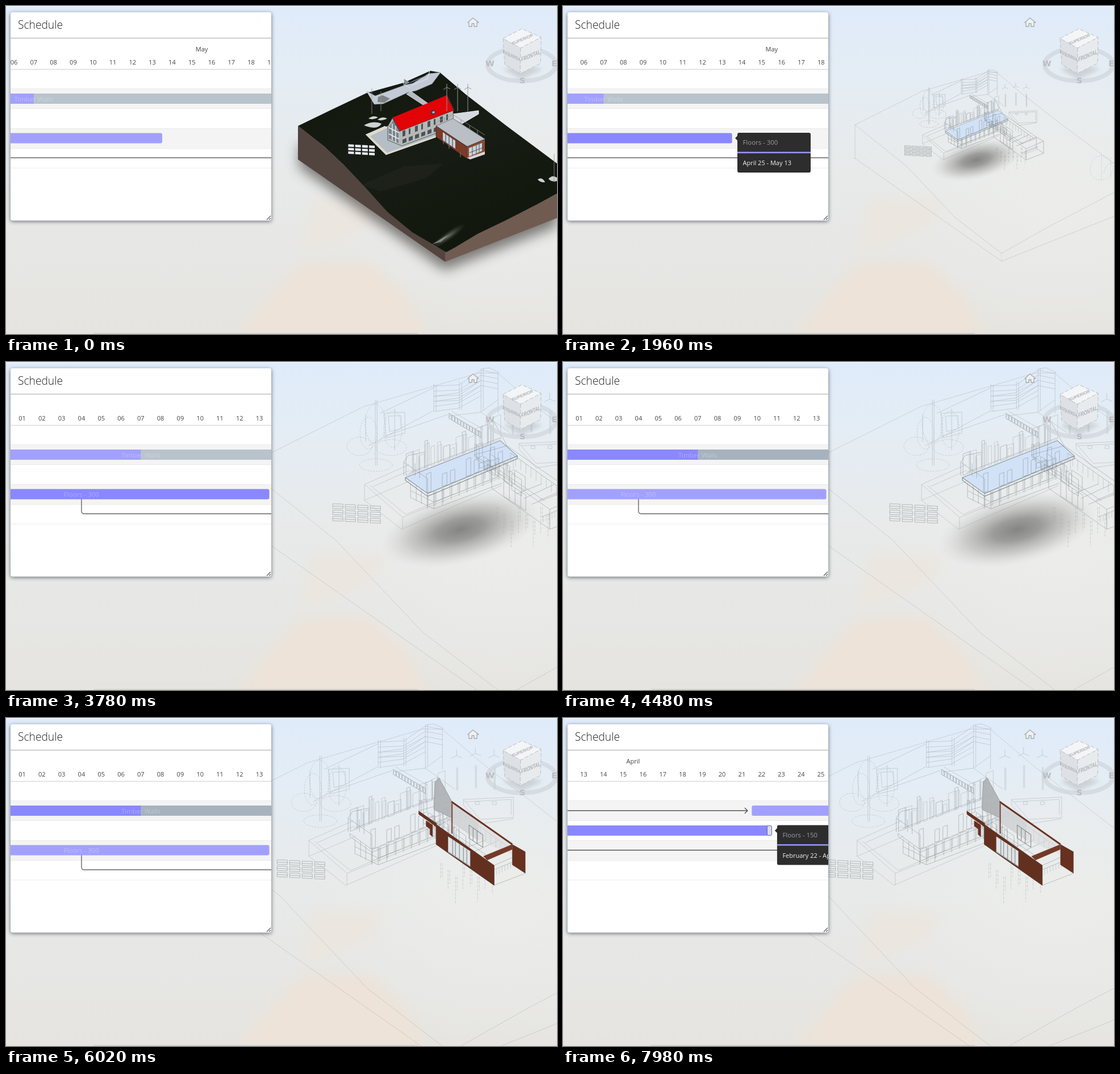
An HTML page for the animation above (8 s loop, 970x577 px).

```html
<!DOCTYPE html>
<html lang="en">
<head>
<meta charset="utf-8">
<title>Schedule</title>
<style>
html, body { margin: 0; width: 100%; height: 100%; overflow: hidden; background: #e5e6e5; }
svg { display: block; width: 970px; height: 577px; }
text { font-family: "Open Sans", "Noto Sans", sans-serif; }
.wire path, .wire ellipse { fill: none; vector-effect: non-scaling-stroke; }
.day { font-size: 11px; fill: #444; text-anchor: middle; }
.label { font-size: 11.4px; fill: #fff; fill-opacity: .29; text-anchor: middle; }
.cube { font: bold 7.2px "Liberation Sans", Arial, sans-serif; fill: #aeb2b6; text-anchor: middle; }
.compass { font: bold 14px "DejaVu Sans", sans-serif; fill: #b9bdc1; text-anchor: middle; }
</style>
</head>
<body>
<svg viewBox="0 0 970 577" xmlns="http://www.w3.org/2000/svg">
<defs>
  <linearGradient id="sky" x1="0" y1="0" x2="0" y2="1">
    <stop offset="0" stop-color="#dfebfa"/><stop offset=".2" stop-color="#e4edf5"/>
    <stop offset=".5" stop-color="#e8eaea"/><stop offset="1" stop-color="#e5e4e0"/>
  </linearGradient>
  <radialGradient id="pale"><stop offset="0" stop-color="#ecedeb"/><stop offset="1" stop-color="#ecedeb" stop-opacity="0"/></radialGradient>
  <radialGradient id="dim">
    <stop offset="0" stop-color="#7f7f7d" stop-opacity=".95"/><stop offset=".3" stop-color="#888886" stop-opacity=".8"/>
    <stop offset=".65" stop-color="#a0a09e" stop-opacity=".42"/><stop offset="1" stop-color="#ccc" stop-opacity="0"/>
  </radialGradient>
  <linearGradient id="ground" x1="0" y1="0" x2=".6" y2="1"><stop offset="0" stop-color="#12170e"/><stop offset=".55" stop-color="#171c14"/><stop offset="1" stop-color="#11170d"/></linearGradient>
  <radialGradient id="shine"><stop offset="0" stop-color="#c4c7c2" stop-opacity=".5"/><stop offset="1" stop-color="#555" stop-opacity="0"/></radialGradient>
  <filter id="soft" x="-20%" y="-20%" width="140%" height="140%"><feGaussianBlur stdDeviation="11"/></filter>
  <filter id="drop" x="-10%" y="-10%" width="120%" height="120%"><feGaussianBlur stdDeviation="3.5"/></filter>
  <clipPath id="inside"><rect x="8" y="57" width="459" height="318"/></clipPath>
</defs>

<rect width="970" height="577" fill="url(#sky)"/>
<ellipse cx="870" cy="330" rx="330" ry="260" fill="url(#pale)"/>
<path d="M520 452L640 450 700 505 745 580 405 580 470 505Z" fill="#ede3d8" filter="url(#soft)"/>
<path d="M540 340L670 340 650 385 520 440Z" fill="#ebe6df" filter="url(#soft)"/>
<rect width="970" height="1.5" fill="#f4f7fb"/>
<rect x="155" y="575" width="570" height="2" fill="#d6d4cf"/>

<g id="solid">
  <path d="M516 240V284L772 465 970 388V345L760 380Z" fill="#55524f" opacity=".75" filter="url(#soft)"/>
  <path d="M514 211L560 247 595 280 633 320 672 363 715 398 775 432 773 450 514 270Z" fill="#52443e"/>
  <path d="M773 432L790 425 830 401 880 377 935 349 970 330V373L773 450Z" fill="#705b51"/>
  <path d="M514 211L576 181 635 153 700 135 747 114 764 117 810 156 880 210 970 277V330L935 349 880 377 830 401 790 425 775 433 715 398 672 363 633 320 595 280 560 247Z" fill="url(#ground)"/>
  <path d="M625 315L700 282 770 277 740 303 660 326Z" fill="#30362f" opacity=".25"/>
  <ellipse cx="778" cy="405" rx="38" ry="8" transform="rotate(-35 778 405)" fill="url(#shine)"/>
  <path d="M750 419q18-11 28-16l-12 12Z" fill="#c9cdc8" opacity=".5"/>
  <path d="M635 150L650 158 702 139 716 136 744 119 765 117 750 137 722 149 708 152 664 172 649 173Z" fill="#c3cad6" stroke="#7d858c" stroke-width=".6"/>
  <path d="M700 128L712 135 738 124 746 114 740 122 718 131 702 139Z" fill="#888f94"/>
  <path d="M635 150l14 23M700 128v10l11 6M746 114l-4 14-28 12" fill="none" stroke="#e4e7ea" stroke-width="1"/>
  <path d="M655 160l8-3 13 6-10 7-12-1Z" fill="#7c8485"/>
  <path d="M705 155l8-5 35 25-6 4Z" fill="#b5bbc2" stroke="#dfe3e6" stroke-width=".8"/>
  <path d="M638 198q9-7 17-2-8 5-17 2M654 200q9-7 17-2-9 5-17 2M630 210q16-9 31-3-4 7-13 7-7 0-18-4M936 305q8-5 13 5-9 1-13-5M955 304q7-8 15-2v6q-10 2-15-4" fill="#cdd2d3"/>
  <path d="M633 226L672 211 680 216 680 229 757 220V231L669 262Z" fill="#b5bdc5"/>
  <path d="M633 226L667 211 672 214 641 229 671 258 757 228V231L669 262Z" fill="#dddacd"/>
  <path d="M787 190L832 184V190L803 207 786 197Z" fill="#d4d9df" stroke="#fff" stroke-width=".8"/>
  <path d="M672 212L681 196 694 220 787 184 788 204 757 217V224L697 246 672 236Z" fill="#b7b8b5" stroke="#454b4e" stroke-width=".8"/>
  <path d="M674 213l8-12 9 20v20l-17-8Z" fill="#78838c"/>
  <path d="M680 207v29M686 211v29M674 225l18 9M674 214l18 9" stroke="#eef1f3" stroke-width="1.4"/>
  <g id="panes" fill="#48535c"></g>
  <path d="M681 196L776 157 788 183 694 220Z" fill="#e20307"/>
  <path d="M680 196L693 221M776 157L789 184" stroke="#34383a" stroke-width="1.5"/>
  <path d="M747 185l7-3 2 7-7 3Z" fill="#394046"/><path d="M750 186l4-1 1 3-4 1Z" fill="#9fc0d4"/>
  <path d="M757 211L787 198 843 234 812 247Z" fill="#b9bfc5" stroke="#777f84"/>
  <path d="M757 211L812 248V269L757 230Z" fill="#7a3b29" stroke="#36241f" stroke-width=".7"/>
  <path d="M769 222l22 15v14l-22-15Z" fill="#c6d1d9"/>
  <path d="M774 224v17M780 229v16M786 232v17" stroke="#343a40"/>
  <path d="M812 248L843 235V257L812 269Z" fill="#8e4934"/>
  <path d="M815 250l23-9v14l-23 10Z" fill="#c8d4dc"/>
  <path d="M821 247v16M828 244v16M833 242v15M816 258l24-9" stroke="#444" stroke-width=".9"/>
  <path d="M812 267l31-11v5l-26 9Z" fill="#d7d7d4"/>
  <path d="M757 204l30-13 56 36M757 204v7M772 198v7M787 191v8M801 200v8M816 210v8M830 218v8M770 235v8M780 243v8M800 258v8" fill="none" stroke="#8d9599" stroke-width=".8"/>
  <g id="sun" fill="#eceff5"></g>
  <g id="mills" fill="none" stroke="#929999"></g>
  <path d="M644 145v45M660 150v35M965 260v50" stroke="#8d9694" stroke-width=".8"/>
</g>

<g id="ghost">
  <g class="wire" stroke="#b4b9bb" stroke-width=".7">
    <path stroke-dasharray="3 1" d="M514 268V209L576 178 632 150 745 117 764 117 810 156 880 210 970 277M514 209L605 282 690 372 772 435 850 391 970 328M514 268L772 449 970 370"/>
    <path stroke-dasharray="1 2" d="M772 435v14"/>
    <path stroke="#a9c6d4" stroke-dasharray="2 2" d="M928 290q2-27 19-26t21 22q-4 21-21 20t-19-16M952 294q4-19 18-18M948 262v45M964 266v40"/>
  </g>
  <ellipse id="shade" cx="727" cy="271" rx="80" ry="34" transform="rotate(-13 727 271)" fill="url(#dim)"/>
  <g transform="matrix(.5596 0 0 .5596 334.6 106.3)">
    <g id="site" class="wire" stroke="#9da4a8" stroke-width=".7" opacity=".6"></g>
    <g id="slab"><path d="M605 203L772 138 802 165 644 231Z" fill="#cadffa" fill-opacity=".75" stroke="#8b96a0"/><path d="M605 203v5l39 28 158-66v-5" fill="none" stroke="#828c95"/></g>
    <g id="house" class="wire" stroke="#70777c" stroke-width=".7" opacity=".58"></g>
    <g id="walls">
      <path d="M753 151L755 112 762 105 785 147V176L753 160Z" fill="#aeb2b4" fill-opacity=".9" stroke="#8d9295" stroke-width=".7"/>
      <path d="M785 149L832 183V216L785 184Z" fill="#d0d3d4" fill-opacity=".85"/>
      <path d="M832 183L891 224V240L832 214Z" fill="#d9dbdc" fill-opacity=".55"/>
      <path d="M784 147L891 222" stroke="#6b3424" stroke-width="3"/>
      <path d="M815 188l24 17v22l-24-16ZM822 193v22M829 198v22" fill="none" stroke="#80868a"/>
      <path d="M785 150v53" stroke="#7a4533" stroke-width="2"/>
      <path d="M726 163L758 185V192L726 169ZM739 180l12 8v21l-5-4v-10l-7-5Z" fill="#66301f"/>
      <path d="M840 243L891 222V231L847 250Z" fill="#743a27"/>
      <path d="M891 222L914 235V273L891 258Z" fill="#67301f"/>
      <path fill-rule="evenodd" d="M757 187L859 259V294L778 237 757 222ZM778 208V236L817 261V234Z" fill="#63301f" stroke="#4c271b" stroke-width=".7"/>
      <path d="M778 208L817 234V261L778 236Z" fill="#dfe4e7" fill-opacity=".85"/>
      <path d="M786 214v27M791 217v27M798 222v27M805 227v26M811 231v27M778 235l39 26" fill="none" stroke="#8a9093" stroke-width="1.2"/>
    </g>
  </g>
</g>

<g id="nav">
  <path d="M813 29l9-8 10 8h-3v7h-5v-5h-4v5h-5v-7Z" fill="#eef0f1" stroke="#a7abae" stroke-width="1.3" stroke-linejoin="round"/>
  <ellipse cx="908" cy="103" rx="60" ry="29" fill="none" stroke="#cdd2d7" stroke-opacity=".6" stroke-width="8"/>
  <path d="M875 111l32 18 38-18-35-8Z" fill="#9da1a5" opacity=".35" filter="url(#drop)"/>
  <text class="compass" x="852" y="106">W</text><text class="compass" x="909" y="136">S</text><text class="compass" x="965" y="106">E</text>
  <path d="M875 57L908 40 942 55 906 74Z" fill="#f3f5f7"/>
  <path d="M875 57L906 74 905 119 878 103Z" fill="#dde1e5"/>
  <path d="M906 74L942 55 941 101 905 119Z" fill="#e8ebee"/>
  <path d="M875 57L908 40 942 55 906 74ZM875 57L878 103 905 119 941 101 942 55M906 74L905 119" fill="none" stroke="#bcc0c4" stroke-dasharray="7 3"/>
  <text class="cube" transform="matrix(1 -.43 .35 1 910 61)" style="font-size:7px">SUPERIOR</text>
  <text class="cube" transform="matrix(1 -.42 0 1.55 924 91)">FRONTAL</text>
  <text class="cube" transform="matrix(1 .48 0 1.55 890 90)" style="font-size:5.4px">ESQUERDA</text>
</g>

<rect x="8" y="13" width="459" height="366" rx="3" fill="#39424c" opacity=".75" filter="url(#drop)"/>
<rect x="8" y="11" width="459" height="366.5" rx="4" fill="#fff"/>
<text x="21" y="40" font-size="19.2" font-weight="300" fill="#222">Schedule</text>
<path d="M8 56.5H467" stroke="#bfbfbf" stroke-width="1.4"/>
<path d="M8 145h459v35H8ZM8 215h459v35H8Z" fill="#f4f4f5"/>
<path d="M8 111.5H467" stroke="#dcdcdc" stroke-width="1.5"/>
<path d="M8 145.5H467M8 180.5H467M8 215.5H467M8 250.5H467M8 285H467" stroke="#ebebeb"/>
<path d="M459 376l7-7M463 376l3-3" stroke="#555" stroke-width="1.1"/>
<g clip-path="url(#inside)">
  <g id="chart">
    <g id="days"></g>
    <g fill="none" stroke="#555" stroke-width="1.4">
      <path d="M-2600 163H-338M-343 158l5 5-5 5M-2600 232.5H-234M-239 227.5l5 5-5 5"/>
      <path d="M104.4 241V262q0 5 5 5H1600" stroke="#666"/>
    </g>
    <rect id="early" x="-2440" y="189" width="2144.5" height="18" rx="3"/>
    <rect id="rest" x="200" y="154" width="548" height="18" rx="2"/>
    <path id="done" d="M208.8 154H-328Q-330.6 154-330.6 157V169Q-330.6 172-328 172H208.8Z"/>
    <rect id="floors" x="-226.2" y="223.5" width="661.2" height="18" rx="3"/>
    <text class="label" x="208.8" y="167.5">Timber Walls</text>
    <text class="label" x="104.4" y="237">Floors - 300</text>
    <rect id="grip" x="-303.5" y="189.5" width="8" height="17" rx="2" fill="#d8d9f2" stroke="#666a85"/>
    <g id="tips"></g>
  </g>
</g>
</svg>
<script>
const NS = "http://www.w3.org/2000/svg", DAY = 34.8;
const $ = id => document.getElementById(id);
function add(parent, tag, attrs, text) {
  const e = document.createElementNS(NS, tag);
  for (const k in attrs) e.setAttribute(k, attrs[k]);
  if (text) e.textContent = text;
  parent.appendChild(e);
  return e;
}
const line = (parent, d, attrs = {}) => add(parent, "path", { d, ...attrs });
let seed = 17;
const rnd = () => (seed = (seed * 16807) % 2147483647) / 2147483647;
const quad = (x, y, w, h, k) => `M${x} ${y}l${w} ${w * k}v${-h}l${-w} ${-w * k}Z`;

// solid model details
for (let i = 0; i < 8; i++) {
  const x = 698 + i * 11;
  line($("panes"), quad(x, 230 - i * 4.1, i % 2 ? 3 : 5, 10, -.39));
  if (i < 6) line($("panes"), quad(x, 242 - i * 4, 7, 7, -.38));
}
for (let c = 0; c < 4; c++) for (let r = 0; r < 3; r++)
  line($("sun"), quad(602.5 + c * 12.2, 247.5 + c * .7 + r * 6.3, 10, 4.3, .05));
for (const x of [776, 795, 813])
  line($("mills"), `M${x} 143v42M${x} 143v-6M${x} 143l-6 4M${x} 143l6 3`);

// wireframe: surroundings
const site = $("site");
for (let c = 0; c < 4; c++) for (let r = 0; r < 3; r++) {
  const x = 477 + c * 22, y = 257 + c * 1.2 + r * 11;
  line(site, quad(x, y, 18, 8, .04) + `M${x} ${y - 4}l18 1`, { stroke: "#6c7377" });
}
for (const [x, y] of [[793, 66], [826, 62], [859, 65]])
  line(site, `M${x} ${y}v-11M${x} ${y}l-10 5M${x} ${y}l10 4M${x} ${y + 21}v40M${x + 2} ${y + 21}v40`);
for (let i = 0; i < 4; i++) {
  const y = i * 9;
  line(site, `M655 ${42 + y}L700 ${40 + y} 738 ${14 + y} 768 ${20 + y}M655 ${60 + y}L698 ${54 + y} 738 ${32 + y}`);
}
line(site, "M655 38V85M659 40V87M700 34V84M704 36V84M738 12V88M742 11V85M768 18V90M738 12L752 10 770 18M680 95L738 88 768 66M655 85L540 147M560 90L655 45M570 130L680 92M738 88L790 125");
line(site, "M533 215L600 273 768 205M533 243L598 294 774 217M533 215V243M600 273V294M533 215L612 180M543 217L606 268 690 232M533 243L615 208M548 219L613 190");
line(site, "M805 143L893 139V175L835 178M805 143L835 178M809 147L889 143V170M805 143V153L835 186 893 177M826 147h7v5h-7ZM856 147h7v5h-7Z");
for (let i = 0; i < 11; i++)
  line(site, quad(682 + i * 5.2, 99 + i * 3.1, 4, 9, .6), { stroke: "#6c7377" });
line(site, "M680 90L738 124M680 98L740 134M686 86L742 118");
line(site, "M552 66V182M555 66V182M535 92V140M586 82V155M567 90L604 88V125L571 133ZM575 95L597 94V117L577 122Z");
for (const [x, y, w, h] of [[552, 108, 18, 34], [524, 148, 22, 16], [580, 150, 27, 14], [553, 181, 29, 11], [540, 125, 15, 28], [583, 118, 16, 32]])
  add(site, "ellipse", { cx: x, cy: y, rx: w, ry: h, "stroke-dasharray": "3 2" });
for (let i = 0; i < 8; i++) {
  const x = 765 + i * 13, y = 255 + (i % 3) * 12;
  line(site, `M${x} ${y}v${28 + rnd() * 22}M${x + 3} ${y}v24`, { "stroke-dasharray": "5 2" });
}

// wireframe: buildings
const house = $("house");
const faint = { stroke: "#9aa1a5" };
for (let i = 0; i < 15; i++) {
  const x = 606 + i * 11, y = 199 - i * 4.2, h = 22 + rnd() * 28;
  line(house, quad(x, y, 5 + rnd() * 9, h, -.38), i % 3 ? faint : {});
  if (i % 2) line(house, quad(x + 2, y - 3, 6, h - 8, -.38), faint);
}
for (let i = 0; i < 11; i++) {
  const x = 642 + i * 14, y = 230 - i * 5.7;
  if (i % 3 !== 1) line(house, quad(x, y, 8, 18 + rnd() * 18, -.39));
  line(house, quad(x + 3, y + 21, 10, 20, -.38), faint);
  line(house, `M${x + 1} ${y + 3}v25M${x + 2} ${y + 3}v25`, faint);
}
line(house, "M602 200V176L610 164 640 158M605 203V208L644 236 802 170M605 203L644 231 802 165M602 176L644 205V254M614 213V238L655 258 775 213M624 217V244M633 224V249M655 227V258M670 222V252M614 226L655 246 768 202M622 200V178M630 204V166M612 194L772 133");
line(house, "M757 187L859 259V294L757 222ZM726 163L757 185M784 147L891 222 914 235V273L891 258V222L840 243M859 259L914 235M859 294L914 273M726 163L784 147M728 170L745 180V205M761 105L784 147M755 112V160M778 208L817 234V261L778 236ZM788 215V242M798 221V249M808 228V255");
for (let i = 0; i < 15; i++) {
  const x = 725 + rnd() * 75, y = 163 + (x - 725) * .65 + rnd() * 18;
  line(house, quad(x, y, 7 + rnd() * 12, 8 + rnd() * 22, rnd() < .5 ? .65 : -.38));
}
for (let i = 0; i < 10; i++)
  line(house, `M${848 + i * 5} ${282 - i * 2.2}v-10M${790 + i * 9} ${177 + i * 6.4}v-17`, faint);
line(house, "M790 160L884 226M770 190L850 244M800 232L845 214M813 240L867 215M827 250L890 226M845 272L897 251");

// chart
for (let d = -34; d <= 34; d++) {
  const n = d < -30 ? d + 62 : d < 0 ? d + 31 : d < 31 ? d + 1 : d - 30;
  add($("days"), "text", { class: "day", x: d * DAY, y: 102.5 }, String(n).padStart(2, "0"));
}
add($("days"), "text", { class: "day", x: 14.5 * DAY, y: 79.5 }, "May");
add($("days"), "text", { class: "day", x: -15.5 * DAY, y: 79.5 }, "April");

function tip(x, y, title, dates) {
  const g = add($("tips"), "g", { transform: `translate(${x} ${y})` });
  line(g, "M-4 9.5L1 4.5V14.5Z", { fill: "#2c2c2c" });
  add(g, "rect", { width: 129, height: 70, rx: 3, fill: "#2d2d2e" });
  add(g, "rect", { y: 33.5, width: 129, height: 2.6, fill: "#9794f2" });
  add(g, "text", { x: 9.5, y: 21, "font-size": 11.4, fill: "#9a9da0" }, title);
  add(g, "text", { x: 9.5, y: 57, "font-size": 11, fill: "#f2f2f2" }, dates);
  return g;
}
const tipLate = tip(444.3, 223, "Floors - 300", "April 25 - May 13");
const tipEarly = tip(-286, 188.5, "Floors - 150", "February 22 - April 22");

// motion
const ramp = (t, a, b) => Math.min(1, Math.max(0, (t - a) / (b - a)));
const smooth = u => u * u * (3 - 2 * u);
const glide = u => (u + smooth(u)) / 2;
const mix = (a, b, u) => a.map((v, i) => Math.round(v + (b[i] - v) * u));
const paint = (id, a, b, u) => $(id).setAttribute("fill", `rgb(${mix(a, b, u)})`);
const show = (e, on) => e.setAttribute("display", on ? "inline" : "none");
const LILAC = [162, 160, 255], VIOLET = [138, 136, 255], MIST = [185, 195, 204], SLATE = [166, 179, 191];

function draw(ms) {
  const t = Math.floor(ms / 70) * 70;
  const x = -160 + 188.5 * glide(ramp(t, 1890, 2310)) + 634.4 * glide(ramp(t, 6790, 7630));
  $("chart").setAttribute("transform", `translate(${x} 0)`);

  const hot = ramp(t, 4060, 4340) - ramp(t, 7630, 7840);
  paint("done", LILAC, VIOLET, hot);
  paint("rest", MIST, SLATE, hot);
  paint("floors", LILAC, VIOLET, t < 4480 ? ramp(t, 980, 1260) : 0);
  paint("early", LILAC, VIOLET, ramp(t, 7350, 7560));
  show($("grip"), t >= 7700);
  show(tipLate, t >= 1120 && t < 4130);
  show(tipEarly, t >= 7700);

  const s = 1 + .787 * Math.pow(ramp(t, 2800, 3290), 1.42);
  const pan = -113.5 * smooth(Math.pow(ramp(t, 5600, 6160), .92));
  $("ghost").setAttribute("transform", `matrix(${s} 0 0 ${s} ${635 * (1 - s) + pan} ${241 * (1 - s)})`);
  const open = t >= 1260, late = t >= 4760;
  show($("solid"), !open);
  show($("ghost"), open);
  show($("slab"), !late);
  show($("shade"), !late);
  show($("walls"), late);
}

const start = performance.now();
function tick() {
  draw((performance.now() - start) % 8000);
  requestAnimationFrame(tick);
}
draw(0);
requestAnimationFrame(tick);
</script>
</body>
</html>
```
